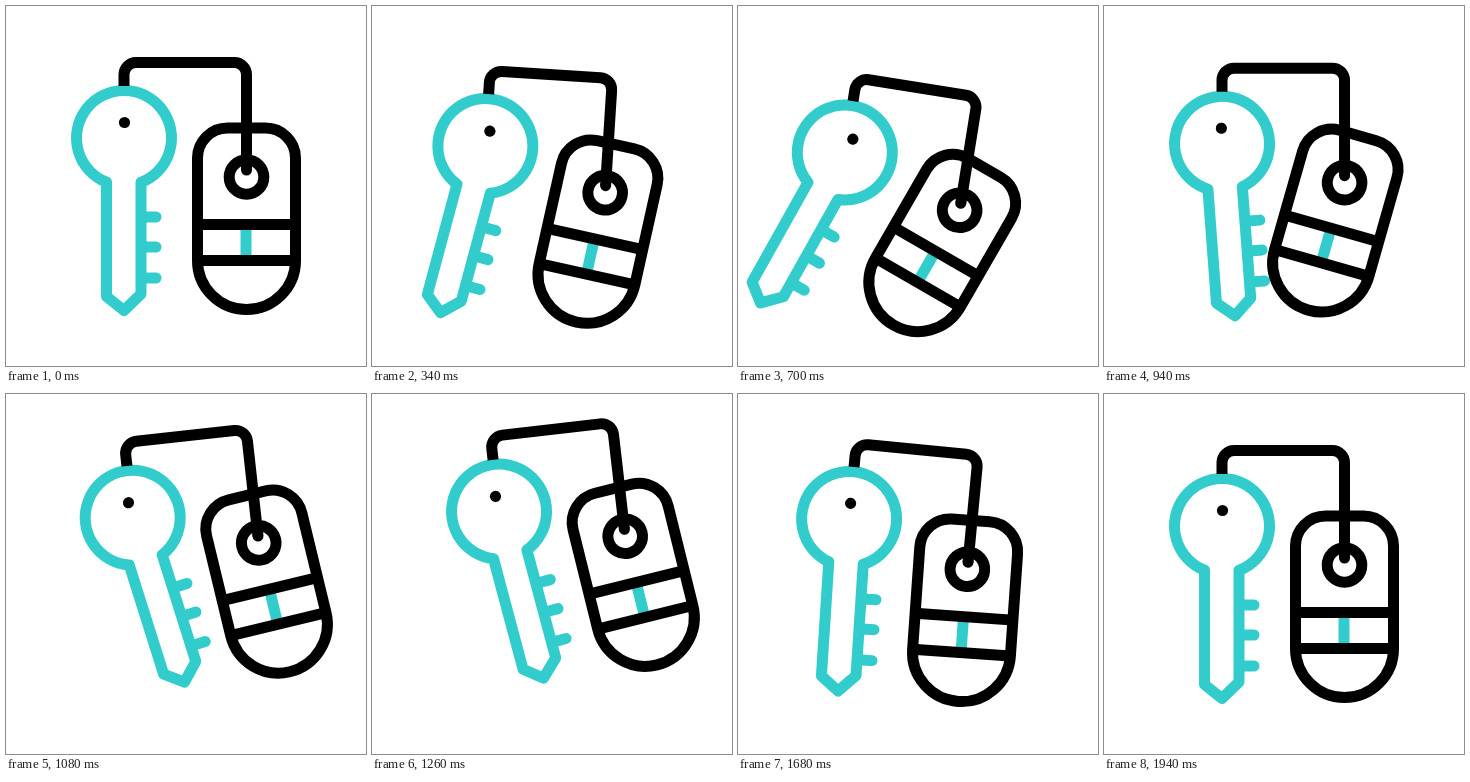
These frames come from a looping animation (360x360 px, 2400 ms). An HTML page:

```html
<!DOCTYPE html>
<html lang="en">
<head>
<meta charset="utf-8">
<title>Key and fob</title>
<style>
  html, body { margin: 0; width: 100%; height: 100%; overflow: hidden; background: #fff; }
  svg { display: block; width: 100vw; height: 100vh; }
  .line { fill: none; stroke: #000; stroke-width: 11; stroke-linejoin: round; }
  .teal { stroke: #33cccc; }
  .solid { fill: #fff; }
  .round { stroke-linecap: round; }
</style>
</head>
<body>
<svg viewBox="0 0 360 360">
  <g id="wire">
    <g id="key">
      <path class="line teal round" d="M135 211H150M135 241H150M135 272H150"/>
      <path class="line teal solid" d="M100.5 176.2A47.5 47.5 0 1 1 135 176.4V288L118 304.5L100.5 290.5Z" stroke-linecap="round"/>
      <circle cx="118.5" cy="116.5" r="5.6"/>
    </g>
    <g id="fob">
      <path class="line solid" d="M221.5 122H259.5A30 30 0 0 1 289.5 152V254.500A49 49 0 0 1 191.5 254.500V152A30 30 0 0 1 221.5 122Z"/>
      <path class="line teal" d="M240 222V251"/>
      <path class="line" d="M191.5 218.500H289.5M191.5 254.500H289.5"/>
      <circle class="line" cx="240.5" cy="171" r="17.300"/>
    </g>
    <path class="line" d="M118 80V68.500A12 12 0 0 1 130 56.500H228.5A12 12 0 0 1 240.5 68.500V164"/>
    <circle cx="240.5" cy="164" r="5.5"/>
  </g>
</svg>
<script>
  const LOOP = 2400;

  // Smooth curve through [ms, value] points, flat at every turning point.
  function curve(points) {
    const slope = i => (points[i + 1][1] - points[i][1]) / (points[i + 1][0] - points[i][0]);
    const tangents = points.map((_, i) => {
      if (i === 0 || i === points.length - 1) return 0;
      const a = slope(i - 1), b = slope(i);
      return a * b > 0 ? 2 * a * b / (a + b) : 0;
    });
    return t => {
      const last = points.length - 1;
      if (t >= points[last][0]) return points[last][1];
      let i = 0;
      while (t >= points[i + 1][0]) i++;
      const [t0, v0] = points[i], [t1, v1] = points[i + 1];
      const d = t1 - t0, u = (t - t0) / d, w = 1 - u;
      return w * w * ((1 + 2 * u) * v0 + u * d * tangents[i])
           + u * u * ((1 + 2 * w) * v1 - w * d * tangents[i + 1]);
    };
  }

  const lift = curve([[0, 0], [340, 12], [665, 25.3], [700, 25], [940, 5.8],
    [1185, -23.5], [1260, -21], [1480, -9.5], [1640, -2], [1760, 0]]);
  const tilt = curve([[0, 0], [340, 3.6], [670, 9.3], [700, 9.1], [940, 0],
    [1170, -8.3], [1260, -6.6], [1480, 12.2], [1635, 6.8], [1930, 0]]);
  const keyTurn = curve([[0, 0], [340, 15], [660, 30], [700, 29.3], [940, -4.2],
    [1130, -19], [1260, -15], [1480, 8.2], [1640, 4.5], [1930, 0]]);
  const fobTurn = curve([[0, 0], [340, 12.5], [680, 30.2], [700, 30], [940, 16],
    [1080, -13.5], [1165, -19.2], [1260, -14], [1485, 10.8], [1640, 5], [1930, 0]]);

  const [wire, key, fob] = ["wire", "key", "fob"].map(id => document.getElementById(id));
  const turn = (angle, x, y) => `rotate(${angle.toFixed(3)} ${x} ${y})`;

  function draw(t) {
    const a = tilt(t);
    wire.setAttribute("transform", `translate(0 ${lift(t).toFixed(3)}) ${turn(a, 179, 56.5)}`);
    key.setAttribute("transform", turn(keyTurn(t) - a, 118, 132));
    fob.setAttribute("transform", turn(fobTurn(t) - a, 240.5, 171));
  }

  const start = performance.now();
  function tick() {
    draw((performance.now() - start) % LOOP);
    requestAnimationFrame(tick);
  }
  tick();
</script>
</body>
</html>
```
